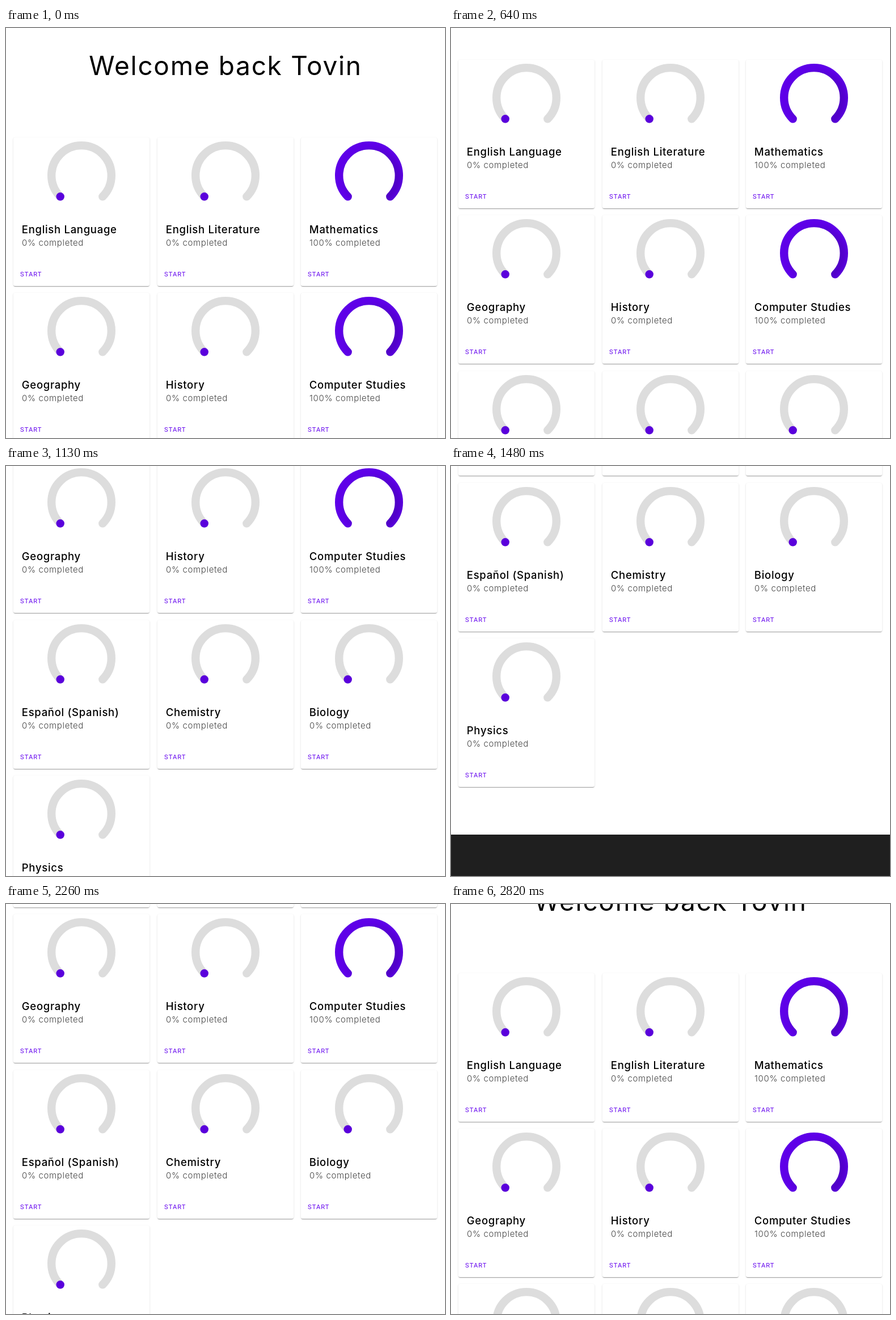
An HTML page that plays this animation: 774x723 px, repeating every 2890 ms.

```html
<!DOCTYPE html>
<html lang="en">
<head>
<meta charset="utf-8">
<title>Course dashboard</title>
<style>
  html, body { margin: 0; width: 100%; height: 100%; overflow: hidden; background: #fff; }
  #page { position: absolute; left: 0; width: 774px; height: 1435px; }
  h1 {
    position: absolute; top: 37px; left: 0; width: 774px; margin: 0;
    font: 400 46px/58px Inter, sans-serif; letter-spacing: 1.7px;
    text-align: center; white-space: nowrap; color: #000;
  }
  .card {
    position: absolute; width: 240px; height: 262px; border-radius: 3px; background: #fff;
    box-shadow: 0 2px 1px -1px rgba(0,0,0,.2), 0 1px 1px rgba(0,0,0,.14), 0 1px 3px rgba(0,0,0,.12);
  }
  .card svg { display: block; width: 240px; height: 262px; }
  .ring { fill: none; stroke: #ddd; stroke-width: 14.4; stroke-linecap: round; }
  .done { stroke: url(#violet); }
  .dot { fill: #5a00dc; }
  .subject { font: 500 18.5px Inter, sans-serif; letter-spacing: .7px; fill: #000; }
  .progress { font: 300 15px Inter, sans-serif; letter-spacing: .65px; fill: #444; }
  .start { font: 400 11.2px Roboto, sans-serif; letter-spacing: 1px; fill: #6200ee; }
  footer { position: absolute; top: 1362px; width: 774px; height: 73px; background: #1f1f1f; }
</style>
</head>
<body>
<svg width="0" height="0" style="position:absolute">
  <radialGradient id="violet" gradientUnits="userSpaceOnUse" cx="8" cy="5" r="58">
    <stop offset=".7" stop-color="#5000c8"/>
    <stop offset="1" stop-color="#5e00e8"/>
  </radialGradient>
</svg>
<div id="page">
  <h1>Welcome back Tovin</h1>
  <footer></footer>
</div>
<script>
const page = document.getElementById('page');
const subjects = ['English Language', 'English Literature', 'Mathematics', 'Geography', 'History',
  'Computer Studies', 'Español (Spanish)', 'Chemistry', 'Biology', 'Physics'];
const completed = new Set(['Mathematics', 'Computer Studies']);
const ARC = 'M-37.3 37.3A52.8 52.8 0 1 1 37.3 37.3';

function addCard(name, i) {
  const done = completed.has(name);
  const card = document.createElement('div');
  card.className = 'card';
  card.style.left = 13.2 + (i % 3) * 253.4 + 'px';
  card.style.top = 193 + Math.floor(i / 3) * 274.4 + 'px';
  card.innerHTML = `<svg>
    <g transform="translate(120 67)">
      <path class="ring ${done ? 'done' : ''}" d="${ARC}"/>
      ${done ? '' : '<circle class="dot" cx="-37.3" cy="37.3" r="7.2"/>'}
    </g>
    <text class="subject" x="14.8" y="168.5">${name}</text>
    <text class="progress" x="15" y="191">${done ? 100 : 0}% completed</text>
    <text class="start" x="12" y="245">START</text>
  </svg>`;
  page.append(card);
}
subjects.forEach(addCard);

const LOOP = 2890, STEP = 70, BOTTOM = 712;
// [time in ms, scroll offset in px]
const down = [[430, 0], [640, 137], [1130, 470], [1480, BOTTOM]];
const up = [[1910, BOTTOM], [2260, 449], [2540, 228], [2820, 71.4]];

function interpolate(keys, t) {
  const next = keys.findIndex(key => key[0] >= t);
  const [t0, y0] = keys[next - 1], [t1, y1] = keys[next];
  return y0 + (y1 - y0) * (t - t0) / (t1 - t0);
}

const snap = (t, start) => start + Math.floor((t - start) / STEP) * STEP;

function scrollAt(t) {
  if (t < 500) return 0;
  if (t < 1480) return interpolate(down, snap(t, 500));
  if (t < 1980) return BOTTOM;
  return interpolate(up, snap(t, 1980));
}

// Moving by layout keeps the cards on whole pixels, as page scrolling does.
function draw(now) {
  page.style.top = -scrollAt(now % LOOP) + 'px';
  requestAnimationFrame(draw);
}
draw(performance.now());
</script>
</body>
</html>
```
